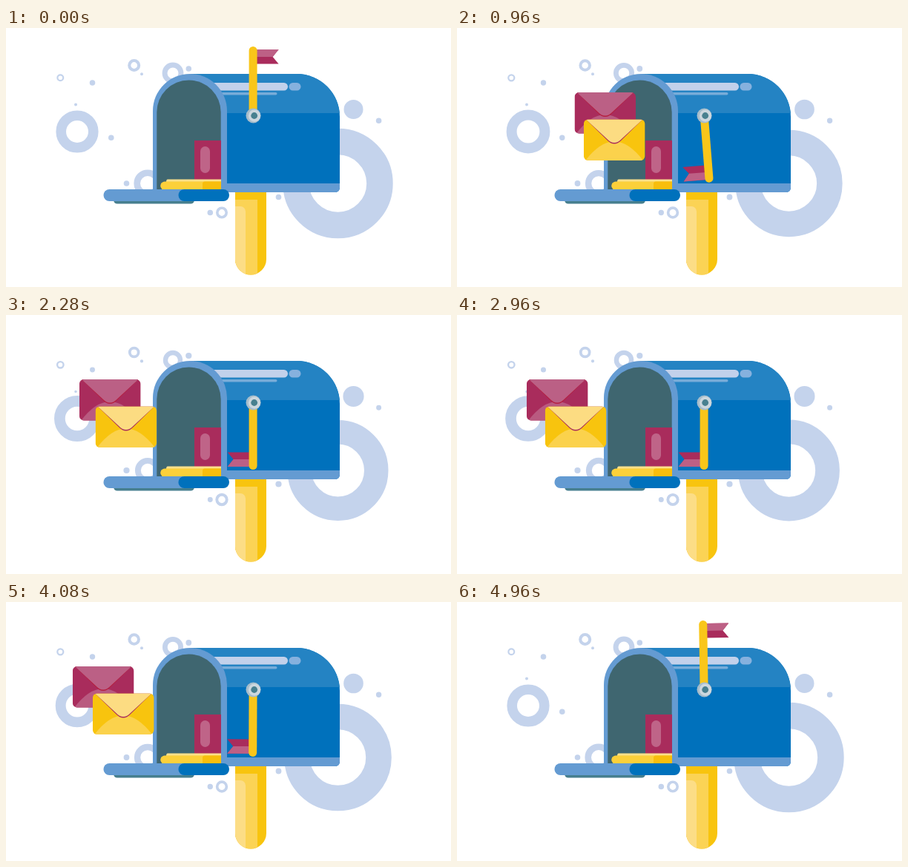
Write an HTML page that moves like this. It is 600x350 px and loops after 5000 ms.

```html
<!DOCTYPE html>
<html lang="en">
<head>
<meta charset="utf-8">
<title>Mailbox</title>
<style>
  html, body { margin: 0; width: 100%; height: 100%; overflow: hidden; background: #fff; }
  svg { display: block; width: 600px; height: 350px; }
</style>
</head>
<body>
<svg viewBox="0 0 600 350" xmlns="http://www.w3.org/2000/svg">
  <defs>
    <clipPath id="mouth">
      <path d="M0 0H246V70A44 43.5 0 0 1 290 113.5V218H0Z"/>
    </clipPath>
    <clipPath id="body">
      <path d="M248 62H392A58 58 0 0 1 450 120V216A6 6 0 0 1 444 222H248Z"/>
    </clipPath>
    <clipPath id="post">
      <path d="M309 220H351V312.5A21 21 0 0 1 309 312.5Z"/>
    </clipPath>
    <clipPath id="card"><rect width="82.5" height="55.5" rx="6"/></clipPath>
  </defs>

  <g id="bubbles" fill="none" stroke="#c4d3ec"></g>

  <g clip-path="url(#post)">
    <path fill="#f8c40e" d="M309 220H351V335H309Z"/>
    <path fill="#fbd355" d="M309 232H339V335H309Z"/>
    <path fill="#fcdd86" d="M309 241H316A7 7 0 0 1 323 248V335H309Z"/>
  </g>

  <g clip-path="url(#body)">
    <path fill="#0071bc" d="M248 62H450V222H248Z"/>
    <path fill="#2483c3" d="M248 62H450V115H248Z"/>
    <rect x="260" y="74" width="120" height="10.4" rx="5.2" fill="#c2d1eb"/>
    <rect x="381.5" y="74" width="16" height="10.4" rx="5.2" fill="#86b1de"/>
    <rect x="270" y="87" width="95.5" height="3.6" rx="1.8" fill="#78acd9"/>
    <path fill="#649bd2" d="M248 210H450V222H248Z"/>
  </g>

  <path fill="#649bd2" d="M198 222V112A50 50 0 0 1 298 112V222Z"/>
  <path fill="#3f6670" d="M203.3 219V113.7A43.2 43.2 0 0 1 289.7 113.7V219Z"/>
  <path fill="#a92c5c" d="M254 152H290V206H254Z"/>
  <rect x="262" y="160" width="13" height="36" rx="6.5" fill="#bf6488"/>
  <path fill="#fbe08a" d="M218 204.5H290V208H216Q216 204.5 218 204.5Z"/>
  <path fill="#fcd03a" d="M214 207.5H290V219H214A5.5 5.5 0 0 1 214 207.5Z"/>
  <path fill="#f8be0c" d="M268 207.5H290V219H265V210.5Q265 207.5 268 207.5Z"/>

  <path fill="#467f8f" d="M145 233H254Q253 237.5 249 237.5H150Q146 237.5 145 233Z"/>
  <rect x="131.5" y="218" width="150" height="16" rx="8" fill="#649bd2"/>
  <rect x="232.5" y="218" width="68.5" height="16" rx="8" fill="#0071bc"/>

  <g clip-path="url(#mouth)">
    <g id="red"></g>
    <g id="yellow"></g>
  </g>

  <g id="flag">
    <path fill="#a92c5c" d="M3 -88H34.5L26.5 -78L34.5 -68.5H3Z"/>
    <path fill="#bd6085" d="M3 -88H34.5L26.5 -78H3Z"/>
    <rect x="-5.5" y="-92" width="11" height="92" rx="5.5" fill="#f9c61a"/>
  </g>
  <circle cx="333.5" cy="118.5" r="10" fill="#a6bdcb"/>
  <circle cx="335" cy="118.5" r="8.2" fill="#ccd7de"/>
  <circle cx="334.7" cy="118.5" r="4.4" fill="#48808f"/>
</svg>

<script>
const LOOP = 5000;
const $ = id => document.getElementById(id);

function make(parent, tag, attrs = {}) {
  const el = document.createElementNS('http://www.w3.org/2000/svg', tag);
  for (const key in attrs) el.setAttribute(key, attrs[key]);
  parent.appendChild(el);
  return el;
}

// Bubbles as x, y, outer radius, inner radius; odd ones swell while even ones shrink.
const bubbles = [
  [447.5, 210, 74.2, 38.7],
  [96, 140, 28.6, 15],
  [191, 210, 18.6, 10],
  [468.5, 110, 13],
  [225, 61, 14.4, 7.5],
  [73.3, 67.3, 5, 2.8],
  [172.7, 50.5, 8.5, 4.4],
  [291, 249.5, 8, 4.4],
  [116.5, 74], [246.3, 55], [141.8, 148.3], [162.5, 210],
  [275.3, 249.5], [367.5, 228.5], [502.6, 125.3],
  [183, 62.3, 2], [94, 103.5, 2]
].map(([x, y, outer = 3.8, inner = 0], i) => {
  const el = make($('bubbles'), 'circle', { r: (outer + inner) / 2, 'stroke-width': outer - inner });
  return { el, x, y, swell: i % 2 ? 0.085 : -0.085 };
});

function drawLetter(g, base, pocket, flap, line) {
  const card = make(g, 'g', { 'clip-path': 'url(#card)' });
  const layer = (d, fill) => make(card, 'path', { d, fill });
  layer('M0 0H83V56H0Z', base);
  layer('M2 56Q41.2 4 80.5 56Z', pocket);
  layer('M3 0L31 27.5Q41.2 38.5 51.5 27.5L79.5 0Z', line);
  layer('M3 0L31 26Q41.2 37 51.5 26L79.5 0Z', flap);
}
drawLetter($('red'), '#a92c5c', '#b95a80', '#bb6085', '#b51f3f');
drawLetter($('yellow'), '#f8c40e', '#fbd24c', '#fcdc82', '#a92c5c');

const letters = [
  { el: $('red'), y: 87, rest: 91.5, enter: 280, tau: 600, leave: 3900, fade: 4200 },
  { el: $('yellow'), y: 123.5, rest: 118.3, enter: 440, tau: 420, leave: 3930, fade: 4310 }
];
const HIDDEN_X = 300;
const FADE = 400;

const ramp = (t, from, to) => Math.min(1, Math.max(0, (t - from) / (to - from)));
const ease = (t, from, to) => {
  const u = ramp(t, from, to);
  return u * u * (3 - 2 * u);
};

// Slides out with a decaying speed, then drifts away ever faster.
function letterX(l, t) {
  const slide = 1 - Math.exp(-Math.max(0, t - l.enter) / l.tau);
  const drift = ramp(t, l.leave, l.leave + 1000);
  return HIDDEN_X + (l.rest - HIDDEN_X) * slide - 62 * drift * drift;
}

// Drops a little too far, settles, and rises again.
const flagAngle = t => 185 * ease(t, 0, 860) - 5 * ease(t, 860, 1400) - 180 * ease(t, 4060, LOOP);

function render(t) {
  const pulse = (1 - Math.cos(2 * Math.PI * t / LOOP)) / 2;
  for (const b of bubbles) {
    b.el.setAttribute('transform', `translate(${b.x} ${b.y}) scale(${1 + b.swell * pulse})`);
  }
  for (const l of letters) {
    l.el.setAttribute('transform', `translate(${letterX(l, t)} ${l.y})`);
    l.el.setAttribute('opacity', 1 - ramp(t, l.fade, l.fade + FADE));
  }
  $('flag').setAttribute('transform', `translate(333.1 117) rotate(${-flagAngle(t)})`);
}

const start = performance.now();
function tick() {
  render((performance.now() - start) % LOOP);
  requestAnimationFrame(tick);
}
render(0);
requestAnimationFrame(tick);
</script>
</body>
</html>
```
